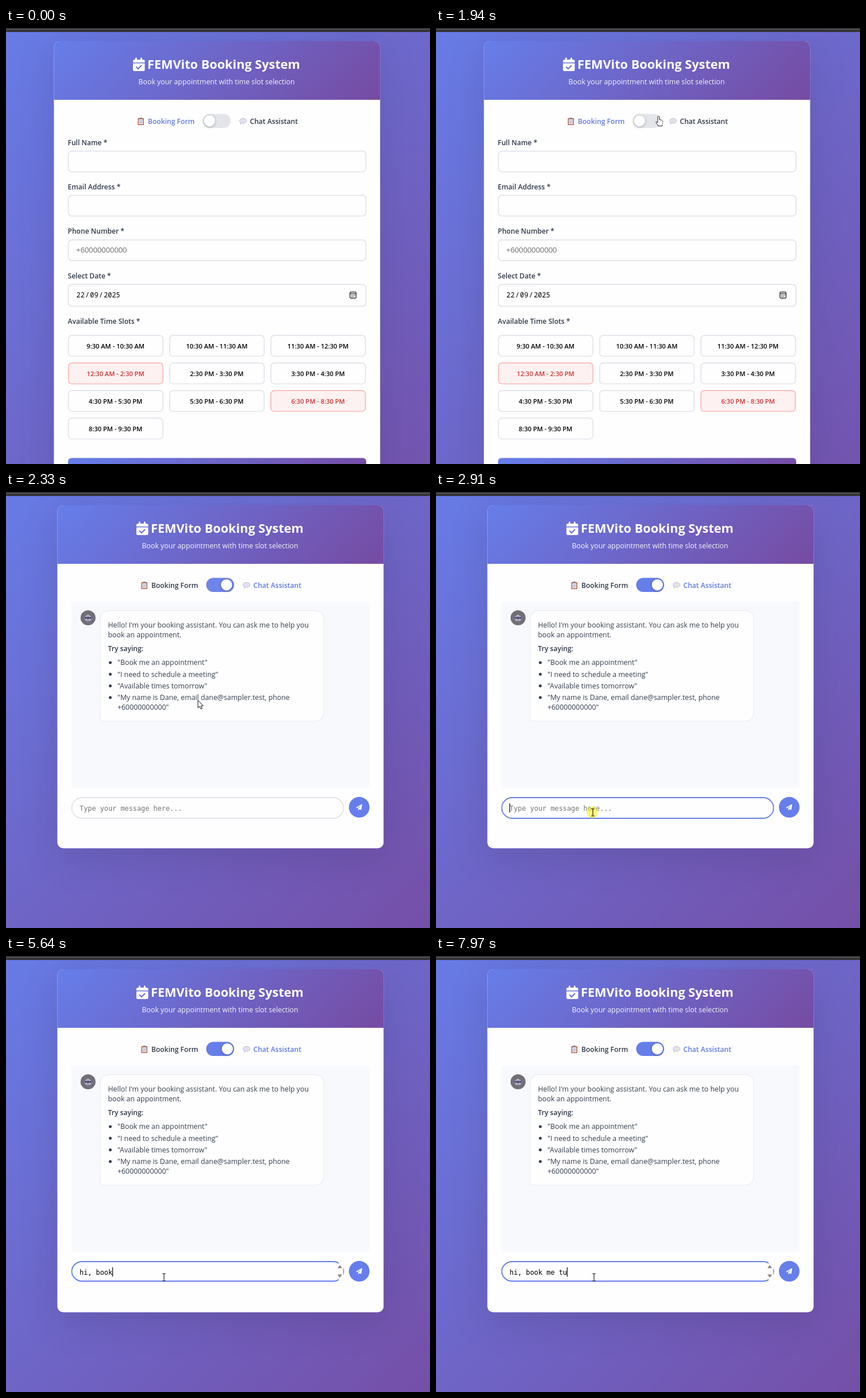
Animation of 738x759 px, one loop 8 s. Source, as an HTML page:

```html
<!DOCTYPE html>
<html lang="en">
<head>
<meta charset="utf-8">
<title>Booking System</title>
<style>
html, body { margin: 0; width: 100%; height: 100%; overflow: hidden; }
svg { display: block; width: 738px; height: 759px; font: 12.33px 'Open Sans', 'Noto Sans', sans-serif; }
text { white-space: pre; }
.b { font-weight: 600; font-size: 12.1px; fill: #2f3747; }
.slot { font-weight: 600; font-size: 11.1px; text-anchor: middle; }
.date { font: 11.9px 'Noto Sans Mono', 'DejaVu Sans Mono', monospace; }
.mono { font: 11.86px 'DejaVu Sans Mono', 'Noto Sans Mono', monospace; }
.field { fill: #fefefe; stroke: #e1e4e9; stroke-width: 1.7; }
.booked { fill: #fdf1f1; stroke: #fcb8b8; }
.shadow { filter: drop-shadow(0 16px 32px rgba(0,0,0,.11)); }
.knob { filter: drop-shadow(0 1px 2px rgba(0,0,0,.3)); }
.talk { fill: #353d4d; }
</style>
</head>
<body>
<svg viewBox="0 0 738 759">
  <defs>
    <linearGradient id="page" gradientUnits="userSpaceOnUse" x1="-50" y1="-50" x2="900" y2="900"><stop stop-color="#667eea"/><stop offset="1" stop-color="#764ba2"/></linearGradient>
    <linearGradient id="head" href="#page" x1="199.5" y1="-93.5" x2="534.5" y2="241.5"/>
    <linearGradient id="submit" href="#page" x1="228.5" y1="628" x2="506.5" y2="906"/>
  </defs>
  <rect width="738" height="759" fill="url(#page)"/>
  <path d="M0 0H738V7H0Z" fill="#333336"/>
  <path d="M0 2.5H738" stroke="#666"/>

  <g id="panel">
    <rect id="card" class="shadow" x="83.4" y="23" width="567.8" rx="10" fill="#fefefe"/>
    <path d="M83.4 125V33a10 10 0 0 1 10-10H641.2a10 10 0 0 1 10 10V125Z" fill="url(#head)"/>
    <g fill="#fff">
      <path d="M221 60V57.5a2.5 2.5 0 0 1 2.5-2.5H225V53a1.4 1.4 0 0 1 2.8 0V55H234V53a1.4 1.4 0 0 1 2.8 0V55H239a2.5 2.5 0 0 1 2.5 2.5V60ZM221 61.5H241.5V72.500a2.5 2.5 0 0 1-2.5 2.5H223.5a2.5 2.5 0 0 1-2.5-2.5Z"/>
      <text x="246" y="71.3" font-size="21.7" font-weight="700">FEMVito Booking System</text>
      <text x="230.5" y="97.5" fill-opacity=".93">Book your appointment with time slot selection</text>
    </g>
    <path d="M227 68l3 3 5.5-5.5" fill="none" stroke="#6c70d2" stroke-width="2" stroke-linecap="round"/>

    <rect x="229.5" y="157" width="10.5" height="12" rx="1" fill="#b5684e"/>
    <path d="M231 159H238.5V167.5H231Z" fill="#e9e6f2"/>
    <path d="M232.5 156H237V159H232.5Z" fill="#8d8a9c"/>
    <path d="M232 161.5h5.5M232 163.5h5.5M232 165.5h4" stroke="#8f9bc4" stroke-width=".8"/>
    <text id="formLabel" class="b" x="247" y="167.3">Booking Form</text>
    <rect x="342.5" y="149.5" width="48.5" height="24.5" rx="12.25" fill="#e3e5ea"/>
    <rect id="track" x="342.5" y="149.5" width="48.5" height="24.5" rx="12.25" fill="#667eea"/>
    <circle id="knob" class="knob" cy="161.7" r="9.7" fill="#fff"/>
    <path d="M408 167.5l.8-2.6c-4-2.5-2-7.4 3.7-7.4 8 0 8.3 8.2.5 8.2l-2.2-.2Z" fill="#e4e1ee" stroke="#b3afc4" stroke-width=".8"/>
    <text id="chatLabel" class="b" x="424.5" y="167.3">Chat Assistant</text>
  </g>

  <g id="form">
    <g id="fields"></g>
    <text x="122" y="390.5" font-family="'Liberation Sans', Arial, sans-serif" font-size="13.2" fill="#757575">+60000000000</text>
    <text class="date" x="122.5" y="469">22<tspan dx="1.2">/</tspan><tspan dx="1.2">09</tspan><tspan dx="1.2">/</tspan><tspan dx="1.2">2025</tspan></text>
    <rect x="598.7" y="459.7" width="10.6" height="10.6" rx="1.8" fill="none" stroke="#111" stroke-width="1.2"/>
    <path d="M599 462.5h10" stroke="#111"/>
    <path d="M601 465.2h7M601 467.7h5" stroke="#111" stroke-width="1.2" stroke-dasharray="1.4 1.2"/>
    <text class="b" x="107.5" y="514.8">Available Time Slots *</text>
    <g id="slots"></g>
    <rect x="108" y="748.5" width="519" height="37" rx="6" fill="url(#submit)"/>
  </g>

  <g id="chat">
    <rect x="113.5" y="190.5" width="519.5" height="324.5" rx="6" fill="#f8f9fd"/>
    <circle cx="142.8" cy="219" r="13.1" fill="#716f78"/>
    <path d="M142.8 213v3" stroke="#ddd" stroke-width="1.2"/>
    <rect x="137.5" y="215" width="10.6" height="9.5" rx="4" fill="#c9bfe2"/>
    <rect x="137.5" y="217.3" width="10.6" height="3.6" rx="1.8" fill="#3d3358"/>
    <path d="M140 219h1.6M144 219h1.6" stroke="#8fd0f0" stroke-width="1.4"/>
    <path d="M140.5 222.8h4.6" stroke="#7c5f9e"/>
    <path d="M178 206.5H539a14 14 0 0 1 14 14V385a14 14 0 0 1-14 14H168a4 4 0 0 1-4-4V220.5a14 14 0 0 1 14-14Z" fill="#fefefe" stroke="#e5e7ee"/>
    <g id="lines" class="talk"></g>
    <text class="b" x="177.5" y="276.8">Try saying:</text>

    <rect id="box" x="114.5" y="532" width="473" rx="18" fill="#fefefe" stroke-width="1.8"/>
    <g id="spinner" fill="#85858d">
      <path d="M579 530H587V568H579Z" fill="#fefefe"/>
      <path d="M577 543.5L581 538 585 543.5ZM577 554.5L581 560 585 554.5Z"/>
    </g>
    <text id="hint" class="mono" x="128" y="554.5" fill="#757575">Type your message here...</text>
    <text id="typed" class="mono" x="128" y="554.5"></text>
    <rect id="caret" y="542" width="1.2" height="16"/>
    <circle cx="614.8" cy="548.8" r="18" fill="#667eea"/>
    <path d="M609 549.5L620 543 618.4 553.6 614.9 552.2 613 554.4V551.3L617.8 545.6 611.5 550.6Z" fill="#fff"/>
  </g>

  <g id="cursor">
    <circle id="glow" cx="-1" cy="-.5" r="10" fill="#f6f01e" fill-opacity=".6"/>
    <path id="arrow" d="M.5.5V14L3.6 11.2 5.6 15.8 7.8 14.8 5.9 10.3H9.8Z" fill="#fff" stroke="#111"/>
    <path id="hand" d="M-1.5 11V2Q-1.5.5 0 .5T1.500 2V6.5L5.8 7.5Q7.5 8 7.3 10L6.5 14V17.5H-1L-1.5 15.5-4.5 12Q-5.2 10.4-3.8 10L-1.5 12Z" fill="#fff" stroke="#222" stroke-dasharray="22 1.5 2 1.5 2 1.5"/>
    <path id="beam" d="M-3-6.5H3M0-6.5V6M-3 6H3" fill="none" stroke="#222" stroke-width="1.2"/>
  </g>
</svg>
<script>
const $ = id => document.getElementById(id);
const show = (id, on) => $(id).style.display = on ? '' : 'none';
const attr = (id, name, value) => $(id).setAttribute(name, value);
const within = (t, a, b) => t >= a && t < b;

$('fields').innerHTML = [
  ['Full Name', 214, 36], ['Email Address', 291, 36],
  ['Phone Number', 368.5, 36], ['Select Date', 446, 38]
].map(([label, y, h]) =>
  `<text class="b" x="107.5" y="${y - 10.2}">${label} *</text>
   <rect class="field" x="108.5" y="${y + .3}" width="518" height="${h}" rx="6"/>`).join('');

const booked = [3, 8];
$('slots').innerHTML = [
  '9:30 AM - 10:30 AM', '10:30 AM - 11:30 AM', '11:30 AM - 12:30 PM',
  '12:30 AM - 2:30 PM', '2:30 PM - 3:30 PM', '3:30 PM - 4:30 PM',
  '4:30 PM - 5:30 PM', '5:30 PM - 6:30 PM', '6:30 PM - 8:30 PM', '8:30 PM - 9:30 PM'
].map((label, i) => {
  const x = 108.7 + i % 3 * 176.2, y = 535.2 + Math.floor(i / 3) * 48;
  const off = booked.includes(i);
  return `<rect class="field ${off ? 'booked' : ''}" x="${x}" y="${y}" width="164.5" height="36.3" rx="6"/>
    <text class="slot" x="${x + 82}" y="${y + 22.3}" fill="${off ? '#cf2e2e' : '#000'}">${label}</text>`;
}).join('');

$('lines').innerHTML = [
  [177.5, 235.5, "Hello! I'm your booking assistant. You can ask me to help you"],
  [177.5, 253, 'book an appointment.'],
  [194, 301.3, '"Book me an appointment"', 1],
  [194, 321.5, '"I need to schedule a meeting"', 1],
  [194, 341.7, '"Available times tomorrow"', 1],
  [194, 362, '"My name is Dane, email dane@sampler.test, phone', 1],
  [194, 379.3, '+60000000000"']
].map(([x, y, s, dot]) => `<text x="${x}" y="${y}">${s}</text>` +
  (dot ? `<circle cx="181.5" cy="${y - 4.3}" r="2.5"/>` : '')).join('');

const message = 'hi, book me tu';
const keys = [3850, 3980, 4250, 4390, 5250, 5510, 5510, 5640, 5840, 5980, 6080, 6180, 7770, 7970];
const caretOn = [[2800, 3110], [3580, 5050], [5250, 6910], [7570, 8000]];

// Pointer path: time, x, y
const path = [
  [250, 707, 745], [320, 707, 745], [790, 716, 718], [1590, 387.5, 169], [1680, 386, 160],
  [1735, 381, 145], [1790, 387.5, 153], [2150, 387.5, 153], [2520, 276, 585], [2660, 276, 585],
  [2780, 273, 558], [3050, 273, 558], [3110, 275, 559.5], [8000, 275, 559.5]
];

function pointerAt(t) {
  const i = Math.max(1, path.findIndex(p => p[0] > t));
  const [t0, x0, y0] = path[i - 1], [t1, x1, y1] = path[i];
  const p = Math.max(0, (t - t0) / (t1 - t0)), e = p * p * (3 - 2 * p);
  return [x0 + (x1 - x0) * e, y0 + (y1 - y0) * e];
}

function draw(t) {
  const chat = t >= 2000;
  const typed = keys.filter(k => t >= k).length;
  show('form', !chat);
  show('chat', chat);
  // The shorter chat page squeezes the background gradient
  attr('page', 'x2', chat ? 820 : 920);
  attr('page', 'y2', chat ? 820 : 920);
  attr('panel', 'transform', `translate(${chat ? 6 : 0})`);
  attr('card', 'height', chat ? 597.3 : 900);
  $('formLabel').style.fill = chat ? '' : '#5f7ae4';
  $('chatLabel').style.fill = chat ? '#5f7ae4' : '';

  const slide = chat ? 1 - (1 - Math.min(1, (t - 1940) / 450)) ** 1.4 : 0;
  attr('knob', 'cx', 354.3 + 25 * slide);
  attr('track', 'opacity', Math.max(0, slide * 1.2 - .2));

  attr('box', 'height', typed ? 34 : 36);
  attr('box', 'stroke', t < 2800 ? '#e2e4ea' : '#667eea');
  show('spinner', typed);
  show('hint', !typed);
  $('typed').textContent = message.slice(0, typed);
  attr('caret', 'x', 127.8 + 7.14 * typed);
  show('caret', caretOn.some(([a, b]) => within(t, a, b)));

  const [x, y] = pointerAt(t);
  const hand = t >= 1560 && t < 2400 && y < 176, beam = t >= 2720;
  attr('cursor', 'transform', `translate(${x} ${y})`);
  show('cursor', within(t, 250, 320) || t >= 790);
  show('hand', hand);
  show('beam', beam);
  show('arrow', !hand && !beam);
  show('glow', within(t, 2800, 3050));
}

function tick() {
  draw(performance.now() % 8000);
  requestAnimationFrame(tick);
}
tick();
</script>
</body>
</html>
```
